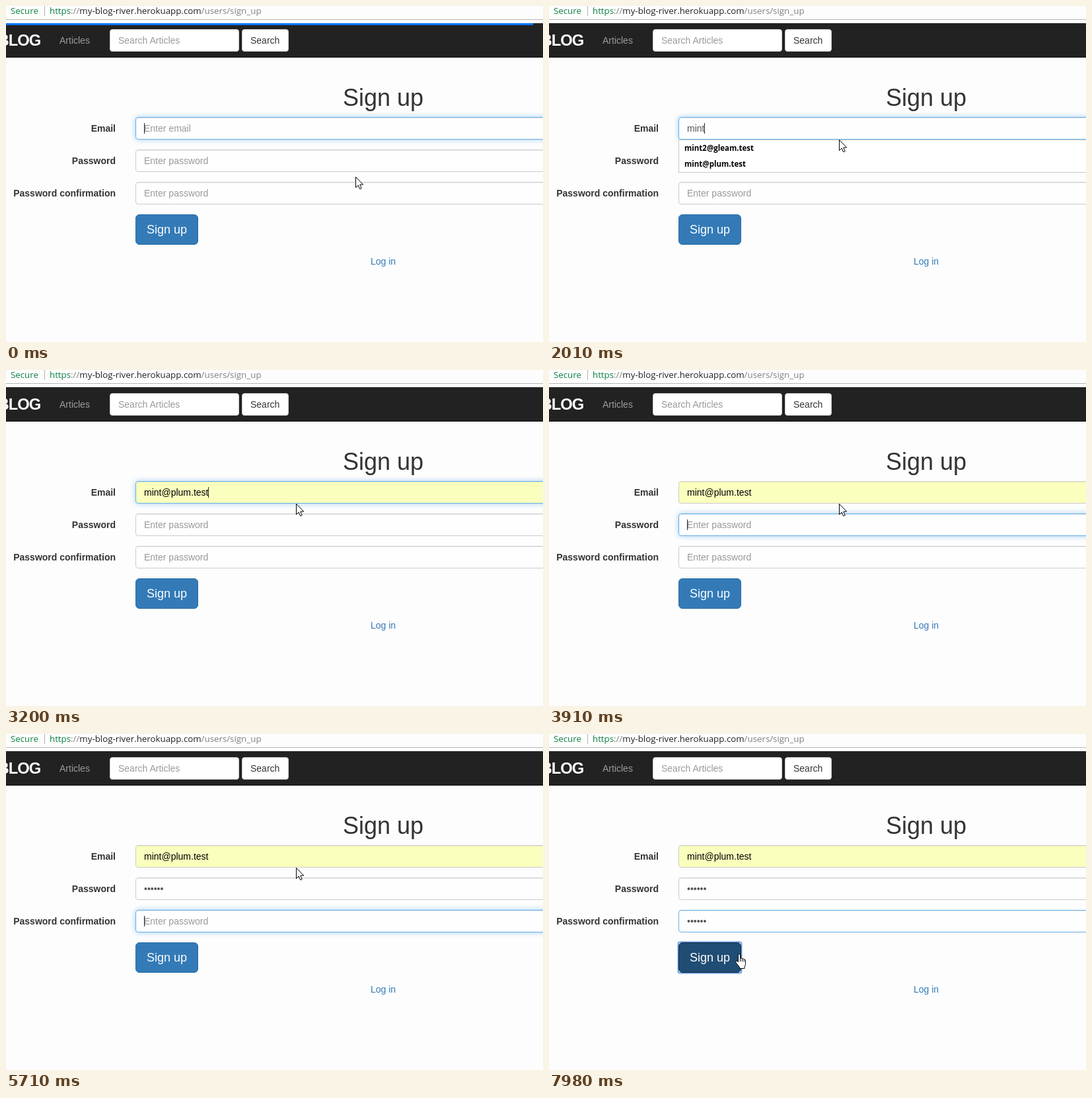
Write an HTML page that moves like this. It is 813 px wide and 508 px high and loops after 8 s.

```html
<!DOCTYPE html>
<html lang="en">
<head>
<meta charset="utf-8">
<title>Sign up</title>
<style>
  html, body { margin: 0; width: 100%; height: 100%; overflow: hidden; background: #fdfdfd; }
  svg { display: block; width: 100%; height: 100%; font: 14px "Liberation Sans", Arial, sans-serif; white-space: pre; }
  .ui { font-family: "Open Sans", "Noto Sans", sans-serif; }
  .bar { font-size: 13.3px; }
  .list { font-size: 11.5px; font-weight: 700; }
  .label { font-weight: 700; fill: #333; text-anchor: end; }
  .hint { fill: #999; }
  .glow { filter: drop-shadow(0 0 4px rgba(102, 175, 233, .6)); }
</style>
</head>
<body>
<svg viewBox="0 0 813 508">
  <rect width="813" height="508" fill="#fdfdfd"/>

  <g class="ui bar">
    <text x="7" y="12" fill="#0b8043">Secure</text>
    <rect x="58" width="1" height="15" fill="#b4b4b4"/>
    <text x="66" y="12" fill="#808080"><tspan fill="#0b8043">https</tspan>://<tspan fill="#222">my-blog-river.herokuapp.com</tspan>/users/sign_up</text>
    <rect y="20" width="813" height="1" fill="#b6b6b6"/>
  </g>

  <rect y="26" width="813" height="52" fill="#222"/>
  <rect y="77" width="813" height="1" fill="#080808"/>
  <text x="-12.5" y="60" font-size="23.8" font-weight="700" letter-spacing="-1" fill="#fff">BLOG</text>
  <text x="81" y="57" fill="#9d9d9d">Articles</text>
  <rect x="157.5" y="35.5" width="195" height="33" rx="3.5" fill="#fff" stroke="#ccc"/>
  <text x="170" y="57" class="hint">Search Articles</text>
  <rect x="357.5" y="35.5" width="70" height="33" rx="3.5" fill="#fff" stroke="#ccc"/>
  <text x="370" y="57" fill="#333">Search</text>
  <rect id="progress" y="26" height="3" fill="#0076ff"/>

  <text x="571" y="151" font-size="36" fill="#333" text-anchor="middle">Sign up</text>
  <g id="form"></g>

  <rect id="ring" x="195.5" y="314.5" width="96" height="47" rx="3" fill="none" stroke="#6ea2e8" stroke-width="2"/>
  <rect id="button" x="196.5" y="315.5" width="94" height="45" rx="5.5"/>
  <text x="213" y="344" font-size="18" fill="#fff">Sign up</text>
  <text x="571" y="391" fill="#337ab7" text-anchor="middle">Log in</text>

  <g id="list" class="ui list">
    <rect x="196.5" y="202.5" width="640" height="49" fill="#fff" stroke="#c8c8c8"/>
    <rect id="pick" x="197" width="640" height="24" fill="#cae4ff"/>
    <text x="205" y="219">mint2@gleam.test</text>
    <text x="205" y="243">mint@plum.test</text>
  </g>

  <path id="arrow" d="M.5 .5V16.5L4.2 13 6.7 18.7 9.2 17.6 6.8 12H11.7Z" fill="#fff" stroke="#000"/>
  <path id="hand" d="M4.5 12.5V2.2Q4.5 .5 6 .5T7.5 2.2V7.6Q8 6.5 9.2 6.8 10.3 7 10.4 8.1 11 7.3 12 7.7 13 8 13.2 9.1 14 8.6 14.8 9.2 15.5 9.8 15.5 11V15.5Q15.5 18 14 20V22.5H6.5V20.6L1.4 14.2Q.2 12.4 1 11.4 2 10.6 3.2 11.6ZM7.5 7.6V12M10.4 8.1V12M13.2 9.1V12.5" fill="#fff" stroke="#000"/>
</svg>

<script>
const LOOP = 8000, LEFT = 209;
const $ = id => document.getElementById(id);
const set = (el, attrs) => { for (const k in attrs) el.setAttribute(k, attrs[k]); };
const show = (el, on) => { el.style.display = on ? '' : 'none'; };

const labels = [['Email', 'Enter email'], ['Password', 'Enter password'], ['Password confirmation', 'Enter password']];
$('form').innerHTML = labels.map(([label, hint], i) => {
  const y = 168 + i * 49;
  return `<text class="label" x="166" y="${y + 22}">${label}</text>
    <g class="field">
      <rect class="box" x="196.5" y="${y + .5}" width="660" height="33" rx="3.5"/>
      <rect x="199" y="${y + 1}" width="640" height="1" fill="#000" opacity=".06"/>
      <text class="hint" x="${LEFT}" y="${y + 22}">${hint}</text>
      <rect class="mark" y="${y + 9}" height="16" fill="#3390ff"/>
      <text x="${LEFT}" y="${y + 22}"><tspan class="head"></tspan><tspan class="tail" fill="#fff"></tspan></text>
      <rect class="caret" y="${y + 9}" width="1" height="16" fill="#222"/>
    </g>`;
}).join('');

const fields = [...document.querySelectorAll('.field')].map(g => {
  const part = name => g.querySelector('.' + name);
  return { box: part('box'), hint: part('hint'), mark: part('mark'), head: part('head'), tail: part('tail'), caret: part('caret') };
});

// Each step changes part of the state and holds until the next one.
// glow switches at once on a focus change, the border colour follows.
const steps = [
  [0, { mouse: [529, 258], bar: 798, fade: 1, glow: 0, border: 0, caret: 1, email: '', tail: '', filled: 0, list: 0, pick: 0, pass: 0, again: 0, button: 'idle' }],
  [120, { mouse: [531, 261], bar: 813 }],
  [270, { mouse: [520, 263], fade: .5 }],
  [400, { mouse: [446, 219], fade: 0, caret: 0 }],
  [550, { mouse: [439, 202] }],
  [960, { caret: 1 }],
  [1480, { email: 'm', list: 1 }],
  [1620, { email: 'mi' }],
  [1760, { email: 'min' }],
  [2010, { email: 'mint' }],
  [2410, { caret: 0 }],
  [2680, { tail: '2@gleam.test', filled: 1, pick: 1 }],
  [2800, { tail: '@plum.test', pick: 2 }],
  [3200, { email: 'mint@plum.test', tail: '', list: 0, caret: 1 }],
  [3760, { glow: 1 }],
  [3910, { border: 1 }],
  [4310, { caret: 0 }],
  [4430, { pass: 1, caret: 1 }],
  [4710, { pass: 3 }],
  [4990, { pass: 4 }],
  [5150, { pass: 6 }],
  [5570, { glow: 2 }],
  [5710, { border: 2 }],
  [5840, { again: 1 }],
  [5970, { again: 2 }],
  [6100, { again: 3 }],
  [6380, { again: 4 }],
  [6510, { again: 6 }],
  [7060, { caret: 0 }],
  [7200, { mouse: [428, 218] }],
  [7330, { mouse: [387, 262] }],
  [7470, { mouse: [318, 315] }],
  [7600, { mouse: [289, 331], button: 'hover', caret: 1 }],
  [7720, { mouse: [284, 332] }],
  [7850, { mouse: [282, 332] }],
  [7980, { button: 'active', glow: -1, caret: 0 }]
];

const buttonLook = {
  idle: { fill: '#337ab7', stroke: '#2e6da4' },
  hover: { fill: '#286090', stroke: '#204d74' },
  active: { fill: '#204d74', stroke: '#122b40' }
};

function drawField(f, i, s) {
  const head = [s.email, '•'.repeat(s.pass), '•'.repeat(s.again)][i];
  const tail = i ? '' : s.tail;
  const filled = !i && s.filled;
  f.head.textContent = head;
  f.tail.textContent = tail;
  set(f.head, { fill: filled ? '#000' : '#555' });
  set(f.box, {
    fill: filled ? '#faffbd' : '#fefefe',
    stroke: s.border === i ? '#66afe9' : '#ccc',
    class: s.glow === i ? 'box glow' : 'box'
  });
  show(f.hint, !head);
  const end = LEFT + (head ? f.head.getComputedTextLength() : 0);
  show(f.mark, tail);
  if (tail) set(f.mark, { x: end, width: f.tail.getComputedTextLength() });
  show(f.caret, s.caret && s.glow === i);
  set(f.caret, { x: Math.round(end) });
}

function draw(t) {
  const s = Object.assign({}, ...steps.filter(([at]) => at <= t).map(([, change]) => change));
  set($('progress'), { width: s.bar, opacity: s.fade });
  fields.forEach((f, i) => drawField(f, i, s));
  show($('list'), s.list);
  show($('pick'), s.pick);
  set($('pick'), { y: s.pick === 2 ? 227 : 203 });
  set($('button'), buttonLook[s.button]);
  show($('ring'), s.button === 'active');
  const over = s.button !== 'idle';
  show($('arrow'), !over);
  show($('hand'), over);
  set(over ? $('hand') : $('arrow'), { transform: `translate(${s.mouse})` });
}

const start = performance.now();
function tick() {
  draw((performance.now() - start) % LOOP);
  requestAnimationFrame(tick);
}
tick();
</script>
</body>
</html>
```
